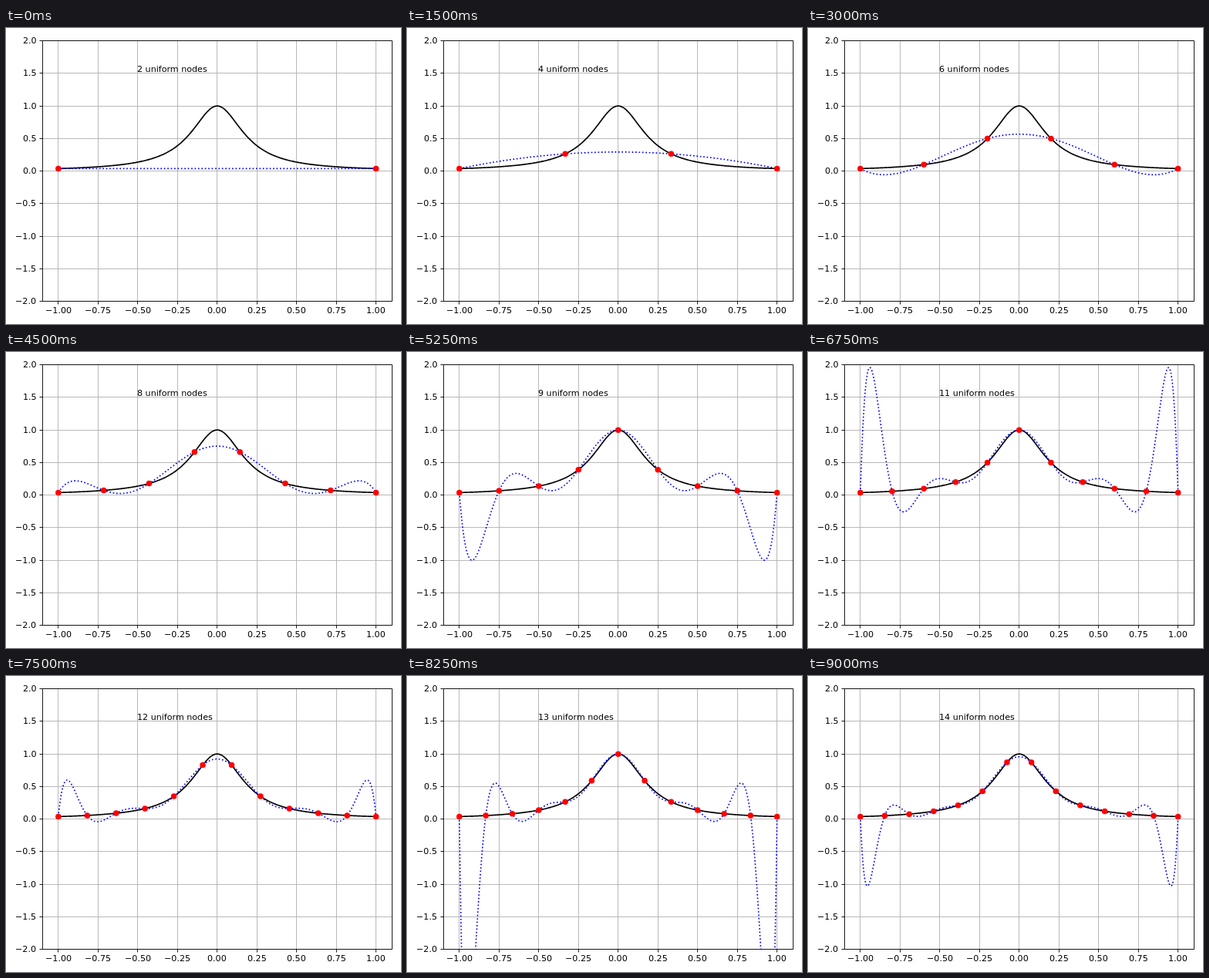
Animation, 512 px wide and 384 px high, one loop 9750 ms. Source, as an HTML page with a canvas:

```html
<!DOCTYPE html>
<html>
<head>
<meta charset="utf-8">
<style>
  html, body { margin: 0; overflow: hidden; background: #fff; }
  canvas { display: block; }
</style>
</head>
<body>
<canvas id="stage" width="512" height="384"></canvas>
<script>
const ctx = document.getElementById('stage').getContext('2d');
const LEFT = 47.5, RIGHT = 500.5, TOP = 16.5, BOTTOM = 354.5;
const STEP = 750, MIN_NODES = 2, STEPS = 13;

const px = x => 273.75 + 205.9 * x;
const py = y => 185.65 - 84.5 * y;
const crisp = v => Math.floor(v) + 0.5;
const label = (v, digits) => v.toFixed(digits).replace('-', '\u2212');
const runge = x => 1 / (1 + 25 * x * x);

// Lagrange interpolation through the given nodes
const interpolate = (nodes, x) => nodes.reduce((sum, a, i) =>
  sum + nodes.reduce((p, b, j) => i === j ? p : p * (x - b) / (a - b), runge(a)), 0);

function line(x1, y1, x2, y2, color) {
  ctx.strokeStyle = color;
  ctx.beginPath();
  ctx.moveTo(x1, y1);
  ctx.lineTo(x2, y2);
  ctx.stroke();
}

// anchor: 0 = left, 0.5 = centre, 1 = right; glyphs start on whole pixels
function text(str, x, y, anchor) {
  ctx.fillStyle = '#000';
  ctx.fillText(str, Math.round(x - anchor * ctx.measureText(str).width), Math.round(y));
}

function curve(f, color, dash) {
  ctx.strokeStyle = color;
  ctx.lineWidth = 1.667;
  ctx.setLineDash(dash);
  ctx.beginPath();
  for (let i = 0; i <= 400; i++) {
    const x = i / 200 - 1;
    ctx.lineTo(px(x), py(f(x)));
  }
  ctx.stroke();
  ctx.setLineDash([]);
}

function drawAxes() {
  ctx.lineWidth = 0.89;
  for (let i = -4; i <= 4; i++) {
    const x = crisp(px(i / 4)), y = crisp(py(i / 2));
    line(x, TOP, x, BOTTOM, '#b0b0b0');
    line(LEFT, y, RIGHT, y, '#b0b0b0');
    line(x, BOTTOM, x, BOTTOM + 4, '#000');
    line(LEFT - 4, y, LEFT, y, '#000');
    text(label(i / 4, 2), px(i / 4), 370, 0.5);
    text(label(i / 2, 1), 39.3, y + 3.6, 1);
  }
}

function drawPlot(nodes) {
  ctx.save();
  ctx.beginPath();
  ctx.rect(LEFT, TOP, RIGHT - LEFT, BOTTOM - TOP);
  ctx.clip();
  curve(runge, '#000', []);
  curve(x => interpolate(nodes, x), '#00f', [1.667, 2.75]);
  ctx.fillStyle = '#f00';
  for (const x of nodes) {
    ctx.beginPath();
    ctx.arc(px(x), py(runge(x)), 3.75, 0, 2 * Math.PI);
    ctx.fill();
  }
  ctx.restore();
}

function draw(count) {
  const nodes = Array.from({ length: count }, (_, i) => 2 * i / (count - 1) - 1);
  ctx.fillStyle = '#fff';
  ctx.fillRect(0, 0, 512, 384);
  ctx.font = '11.11px "DejaVu Sans", sans-serif';
  ctx.lineJoin = 'round';

  drawAxes();
  drawPlot(nodes);
  ctx.lineWidth = 0.89;
  ctx.strokeStyle = '#000';
  ctx.strokeRect(LEFT, TOP, RIGHT - LEFT, BOTTOM - TOP);
  text(count + ' uniform nodes', 170, 57, 0);
}

const start = performance.now();
function frame() {
  const step = Math.floor((performance.now() - start) / STEP) % STEPS;
  draw(MIN_NODES + step);
  requestAnimationFrame(frame);
}
frame();
</script>
</body>
</html>
```
